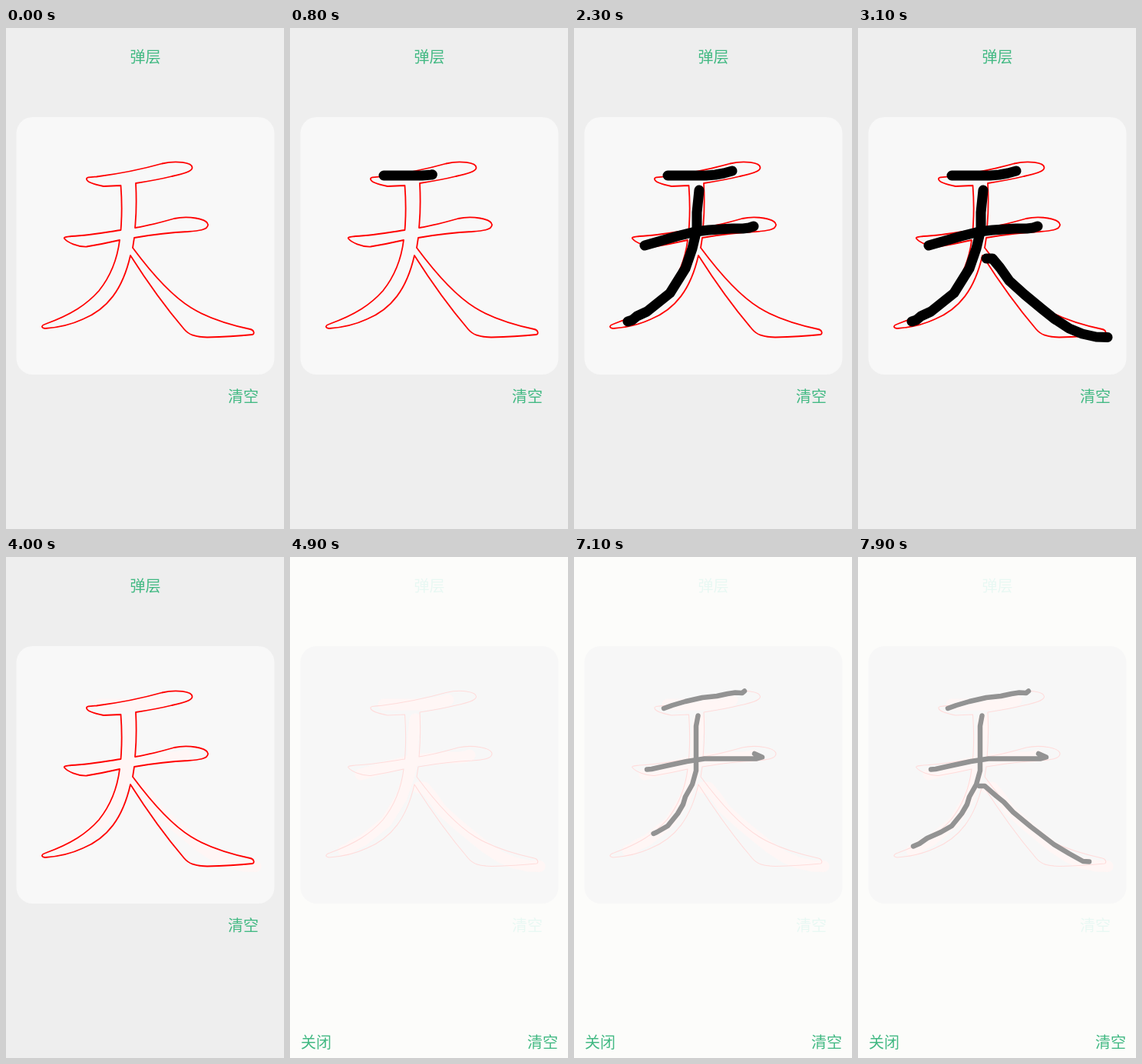
These frames come from a looping animation (362 px wide and 652 px high, 8 s). An HTML page:

```html
<!DOCTYPE html>
<html lang="zh-CN">
<head>
<meta charset="utf-8">
<style>
  html, body { margin: 0; width: 100%; height: 100%; overflow: hidden; background: #eee; }
  svg { display: block; width: 362px; height: 652px; background: #eee; }
  text { font: 300 20px "Noto Sans CJK SC", "Noto Sans CJK", sans-serif; fill: #42b983; }
  .panel { fill: #f8f8f8; }
  .guide { fill: none; stroke: #f00; stroke-width: 1.8; stroke-linejoin: round; }
  .ink path { fill: none; stroke-linecap: round; stroke-linejoin: round; }
  #ghost { stroke: #fff6f5; stroke-width: 15; }
  #brush { stroke: #000; stroke-width: 13; }
  #pen { stroke: #939393; stroke-width: 6.5; }
  .bar { display: none; }
  .layer { background: #fcfcfa; }
  .layer .panel { fill: #f7f7f7; }
  .layer .guide { stroke: #ffdcdb; stroke-width: 1.1; }
  .layer .page { fill: #e8f8f3; }
  .layer .bar { display: block; }
</style>
</head>
<body>
<svg id="stage" viewBox="0 0 362 652">
  <rect class="panel" x="13.5" y="116" width="336" height="335" rx="21"/>
  <text class="page" x="161.5" y="44.5">弹层</text>
  <text class="page" x="289" y="486.5">清空</text>
  <g id="ghost" class="ink"></g>
  <path class="guide" d="M149.5 205L127 206C117 204 106 201 105 197C104 194 110 194 118 193.5
    C145 190 180 183 203 176.5C222 172 243 175 242.5 182C242 187 230 190 216 193C200 197 182 200 169 202
    C170 222 170 240 168 260C187 257 205 252 219 248C237 244 262 248 263 256C263 263 250 264 237 265
    C213 266 190 269 167 273L165 286C188 317 215 348 241 364C265 379 295 387 318 392C323 393 324 398 321 399
    C300 401 280 402 262 402.5C245 402 238 399 232 392C208 364 183 329 162 296C152 340 132 366 100 379
    C85 386 65 390 51 391C45 390 46 387 52 385C85 373 105 360 121 342C137 322 145 300 148 276
    C135 279 120 282 105 284.5C93 285 80 279 76 274C75 272 78 272 85 271C108 270 130 266 149.5 263
    C151 245 151 225 149.5 205Z"/>
  <g id="brush" class="ink"></g>
  <g id="pen" class="ink"></g>
  <g class="bar">
    <text x="14" y="638.5">关闭</text>
    <text x="309" y="638.5">清空</text>
  </g>
</svg>
<script>
const LOOP = 8000, CLEAR = 4000, OPEN = 4900, STEP = 100;
const byId = id => document.getElementById(id);

// share of a stroke drawn after each step
const PACE = {
  3: [.3, .75, 1],
  4: [.17, .5, .83, 1],
  5: [.1, .3, .55, .8, 1]
};

const brush = [
  { at: 700, steps: 3, d: 'M122 192L160 192 172 192 184 191 195 189 206 186' },
  { at: 1500, steps: 3, d: 'M92 283L134 271 158 265 175 263 205 261 220 261 228 260 234 258' },
  { at: 2100, steps: 3, d: 'M163 211L160 240 160 262 154 287 145 313 125 345 95 369 82 375 76 380 70 382' },
  { at: 2700, steps: 5, d: 'M167 300L175 300 185 312 197 329 217 347 240 366 255 378 275 391 292 398 310 402 325 402.5' }
];
const pen = [
  { at: 5600, steps: 3, d: 'M117 197L128 193 145 188 167 183 186 181 200 178 210 176.5 219 177 222 174.5' },
  { at: 6300, steps: 4, d: 'M95 276.5L101 276 119 272 147 266 170 262.5 215 262.5 238 262.5 245 260.5 235 256' },
  { at: 6900, steps: 4, d: 'M161.5 206.5L159 220 159 278 154 296 145 312 142 322 135 334 122 350 108 358 90 366 80 373 72 376.5' },
  { at: 7600, steps: 4, d: 'M158 298L165 298 180 311 190 319 202 332 225 351 255 374 275 386 293 396 301 396.5' }
];

function addPath(group, d) {
  const path = document.createElementNS('http://www.w3.org/2000/svg', 'path');
  path.setAttribute('d', d);
  byId(group).append(path);
  return path;
}

function addStroke(group, stroke, end) {
  const el = addPath(group, stroke.d);
  return { ...stroke, el, end, length: el.getTotalLength() };
}

const strokes = [
  ...brush.map(s => addStroke('brush', s, CLEAR)),
  ...pen.map(s => addStroke('pen', s, LOOP))
];
brush.forEach(s => addPath('ghost', s.d));

function draw(t) {
  byId('stage').classList.toggle('layer', t >= OPEN);
  document.body.style.background = t >= OPEN ? '#fcfcfa' : '#eee';
  byId('ghost').style.display = t >= CLEAR ? '' : 'none';
  for (const { el, at, end, steps, length } of strokes) {
    const shown = t >= at && t < end;
    el.style.display = shown ? '' : 'none';
    if (!shown) continue;
    const step = Math.min(steps - 1, Math.floor((t - at) / STEP));
    const part = PACE[steps][step];
    el.style.strokeDasharray = part < 1 ? `${part * length} ${2 * length}` : 'none';
  }
}

function tick() {
  draw(performance.now() % LOOP);
  requestAnimationFrame(tick);
}
tick();
</script>
</body>
</html>
```
